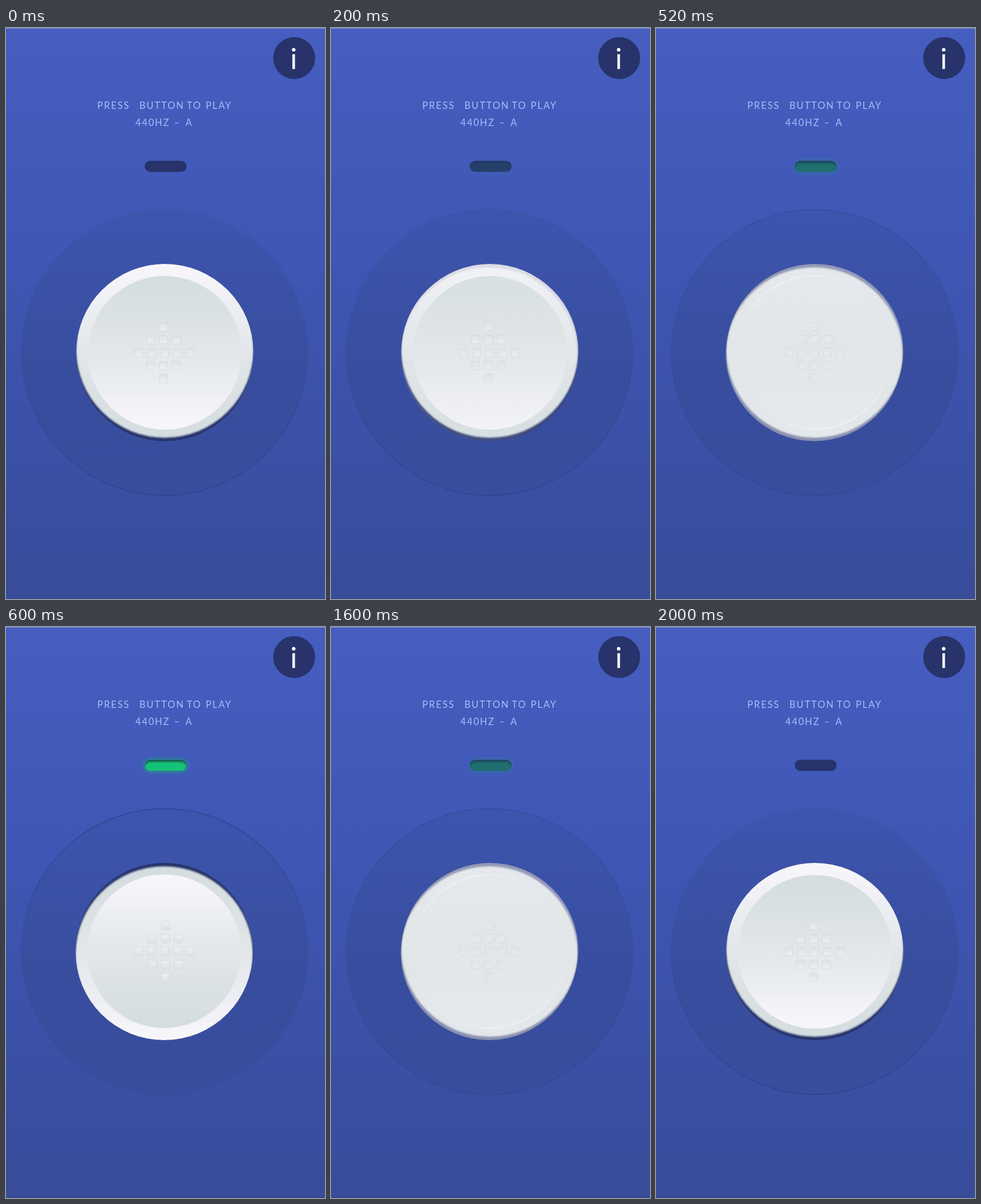
Write an HTML page without scripts that moves like this. It is 559 px wide and 1002 px high and loops after 2200 ms.

```html
<!DOCTYPE html>
<html lang="en">
<head>
<meta charset="utf-8">
<title>Tone button</title>
<style>
  html, body { margin: 0; width: 100%; height: 100%; overflow: hidden; background: #3e55b2; }
  svg { display: block; width: 559px; height: 1002px; }
  text { font-family: Lato, sans-serif; }
  .label { font-size: 16.5px; letter-spacing: 1.9px; fill: #adbbfa; }
  .info { font-size: 51px; fill: #fff; text-anchor: middle; }

  /* The pressed layers fade in, hold, and fade out in discrete steps. */
  .pressed { opacity: 0; animation: press 2.2s step-end infinite; }
  .dial { --slight: .13; --half: .48; }
  .lamp { --slight: .09; --half: .42; }
  @keyframes press {
    0% { opacity: 0; }
    9.0909% { opacity: var(--slight); }
    18.1818% { opacity: var(--half); }
    27.2727% { opacity: 1; }
    72.7273% { opacity: var(--half); }
    81.8182% { opacity: var(--slight); }
    90.9091%, 100% { opacity: 0; }
  }
</style>
</head>
<body>
<svg viewBox="0 0 559 1002">
  <defs>
    <linearGradient id="backdrop" x2="0" y2="1">
      <stop stop-color="#465ec0"/>
      <stop offset=".4" stop-color="#3f56b4"/>
      <stop offset="1" stop-color="#384c9a"/>
    </linearGradient>
    <linearGradient id="well" x2="0" y2="1">
      <stop stop-color="#3d55ae"/>
      <stop offset=".6" stop-color="#384d9d"/>
      <stop offset="1" stop-color="#384e9d"/>
    </linearGradient>
    <linearGradient id="wellEdge" x2="0" y2="1">
      <stop offset=".45" stop-color="#2d4088" stop-opacity="0"/>
      <stop offset=".95" stop-color="#2d4088" stop-opacity=".8"/>
    </linearGradient>
    <linearGradient id="shade" x2="0" y2="1">
      <stop stop-color="#d3dddf"/>
      <stop offset=".35" stop-color="#dee3e5"/>
      <stop offset=".5" stop-color="#e3e7ea"/>
      <stop offset=".74" stop-color="#ebeef3"/>
      <stop offset=".8" stop-color="#f1f0f6"/>
      <stop offset="1" stop-color="#f7f7fb"/>
    </linearGradient>
    <linearGradient id="rim" href="#shade" y1="1" y2="0"/>
    <linearGradient id="keyFill" x2="0" y2="1">
      <stop stop-color="#dde2e4"/>
      <stop offset="1" stop-color="#eeeff3"/>
    </linearGradient>
    <filter id="soft"><feGaussianBlur stdDeviation="1.6"/></filter>
    <filter id="glow" x="-50%" y="-150%" width="200%" height="400%">
      <feGaussianBlur stdDeviation="5"/>
    </filter>
    <clipPath id="dialClip"><circle cx="278.3" cy="569.5" r="155.5"/></clipPath>
    <rect id="pill" x="243" y="233" width="73.5" height="19.5" rx="9.75"/>
    <clipPath id="pillClip"><use href="#pill"/></clipPath>

    <rect id="key" x="-7.2" y="-7.2" width="14.4" height="14.4" rx="2.5"
          fill="url(#keyFill)" stroke="#cdd4d7" stroke-opacity=".75"/>
    <g id="trio">
      <use href="#key" x="-22.7"/><use href="#key"/><use href="#key" x="22.7"/>
    </g>

    <g id="dial">
      <circle cx="277.75" cy="569.5" r="250.8" fill="none" stroke="url(#wellEdge)" stroke-width="1.6"/>
      <g clip-path="url(#dialClip)">
        <circle cx="278.3" cy="569.5" r="156" fill="#27336a"/>
        <circle cx="278.3" cy="563.5" r="155.5" fill="url(#rim)" filter="url(#soft)"/>
      </g>
      <circle cx="278.4" cy="570" r="134.8" fill="url(#shade)"/>
      <use href="#key" x="276" y="524"/>
      <use href="#trio" x="276" y="546.8"/>
      <use href="#key" x="232.4" y="569.5"/>
      <use href="#trio" x="277.8" y="569.5"/>
      <use href="#key" x="323.2" y="569.5"/>
      <use href="#trio" x="276" y="592.2"/>
      <use href="#key" x="276" y="615"/>
    </g>
  </defs>

  <rect width="559" height="1002" fill="url(#backdrop)"/>
  <path d="M0 .5H559" stroke="#fff" stroke-opacity=".35"/>
  <path d="M0 1001.5H559" stroke="#2d4088" stroke-opacity=".5"/>

  <circle cx="505" cy="52.7" r="36.8" fill="#27336a"/>
  <text class="info" x="504.2" y="71.8">i</text>

  <text class="label" y="142.3">
    <tspan x="160">PRESS</tspan> <tspan x="233.8">BUTTON</tspan>
    <tspan x="316.7">TO</tspan> <tspan x="350">PLAY</tspan>
  </text>
  <text class="label" y="172.3">
    <tspan x="226.7">440HZ</tspan> <tspan x="294.5">–</tspan> <tspan x="314.5">A</tspan>
  </text>

  <use href="#pill" fill="#27336a"/>
  <g class="pressed lamp">
    <use href="#pill" fill="#18c078" opacity=".8" filter="url(#glow)"/>
    <g clip-path="url(#pillClip)">
      <use href="#pill" fill="#146650"/>
      <use href="#pill" y="4" fill="#18c278" filter="url(#soft)"/>
    </g>
  </g>

  <circle cx="277.75" cy="569.5" r="251.6" fill="url(#well)"/>
  <use href="#dial"/>
  <g class="pressed dial">
    <circle cx="277.75" cy="569.5" r="251.6" fill="url(#well)"/>
    <use href="#dial" transform="rotate(180 277.75 569.5)"/>
  </g>
</svg>
</body>
</html>
```
